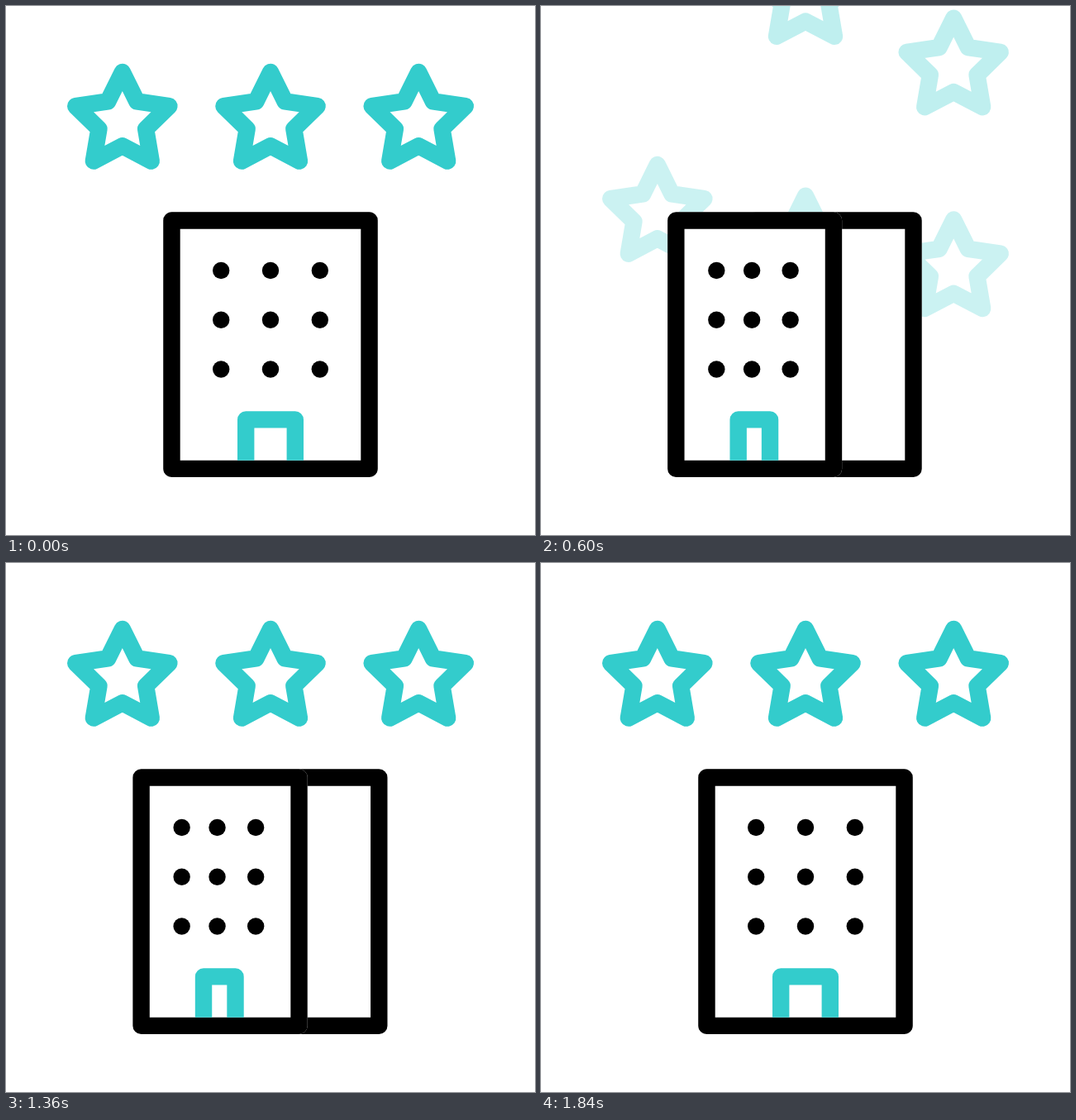
These frames come from a looping animation (640x640 px, 2 s). An HTML page with a canvas:

```html
<!DOCTYPE html>
<html lang="en">
<head>
<meta charset="utf-8">
<title>Three star hotel</title>
<style>
  html, body { margin: 0; width: 100%; height: 100%; overflow: hidden; background: #fff; }
  canvas { display: block; }
</style>
</head>
<body>
<canvas id="stage" width="640" height="640"></canvas>
<script>
const ctx = document.getElementById('stage').getContext('2d');
const LOOP = 2000, STEP = 40, TEAL = '#3cc', BLACK = '#000';

const clamp = v => Math.min(1, Math.max(0, v));
const mix = (a, b, p) => a + (b - a) * p;
const ramp = (t, start, end) => clamp((t - start) / (end - start));
const smooth = u => u * u * (3 - 2 * u);
// Cubic ease with a soft start and a firmer stop
const rise = u => 0.3 * u * (1 - u) ** 2 + 2.58 * u * u * (1 - u) + u ** 3;

const STARS = [
  { x: 140.8, leave: 120, arrive: 300 },
  { x: 320, leave: 290, arrive: 410 },
  { x: 499.2, leave: 396, arrive: 520 }
];

function star(cx, cy) {
  ctx.beginPath();
  for (let i = 0; i < 10; i++) {
    const r = i % 2 ? 29.8 : 59.5, a = i * Math.PI / 5;
    ctx.lineTo(cx + r * Math.sin(a), cy - r * Math.cos(a));
  }
  ctx.closePath();
  ctx.stroke();
}

function drawStars(t) {
  ctx.strokeStyle = TEAL;
  for (const { x, leave, arrive } of STARS) {
    ctx.globalAlpha = 1 - ramp(t, 160, 800);
    star(x, 139.5 - 0.00157 * Math.max(0, t - leave) ** 2);
    ctx.globalAlpha = ramp(t, 520, 840);
    star(x, 139.5 + 190 * (1 - rise(ramp(t, arrive, arrive + 677))));
  }
  ctx.globalAlpha = 1;
}

function panel(left, right) {
  ctx.beginPath();
  ctx.rect(left, 259.5, right - left, 300.4);
  ctx.fillStyle = ctx.strokeStyle = '#fff';
  ctx.fill();
  ctx.stroke();
  ctx.strokeStyle = BLACK;
  ctx.stroke();
}

function drawHotel(t) {
  const open = smooth(ramp(t, 120, 640));
  const turn = open - smooth(ramp(t, 1320, 1760));
  const slide = open - smooth(ramp(t, 1420, 1840));

  const half = mix(119.5, 94.9, turn);
  const side = mix(320, 355.8, slide);
  panel(side - half, side + half);
  panel(mix(200.5, 162.7, turn), mix(439.5, 352.5, turn));

  ctx.fillStyle = BLACK;
  for (const [from, to] of [[260.2, 211.5], [320, 254], [379.8, 300.3]]) {
    for (const y of [320, 379.8, 439.5]) {
      ctx.beginPath();
      ctx.arc(mix(from, to, turn), y, 10.2, 0, 2 * Math.PI);
      ctx.fill();
    }
  }

  const doorLeft = mix(290.2, 237.8, turn), doorRight = mix(349.8, 275.8, turn);
  ctx.strokeStyle = TEAL;
  ctx.beginPath();
  ctx.moveTo(doorLeft, 549.7);
  ctx.lineTo(doorLeft, 500.4);
  ctx.lineTo(doorRight, 500.4);
  ctx.lineTo(doorRight, 549.7);
  ctx.stroke();
}

function draw(now) {
  const t = Math.floor((now % LOOP + 1) / STEP) * STEP % LOOP;
  ctx.fillStyle = '#fff';
  ctx.fillRect(0, 0, 640, 640);
  ctx.lineWidth = 20.4;
  ctx.lineJoin = 'round';
  drawStars(t);
  drawHotel(t);
  requestAnimationFrame(draw);
}
requestAnimationFrame(draw);
</script>
</body>
</html>
```
